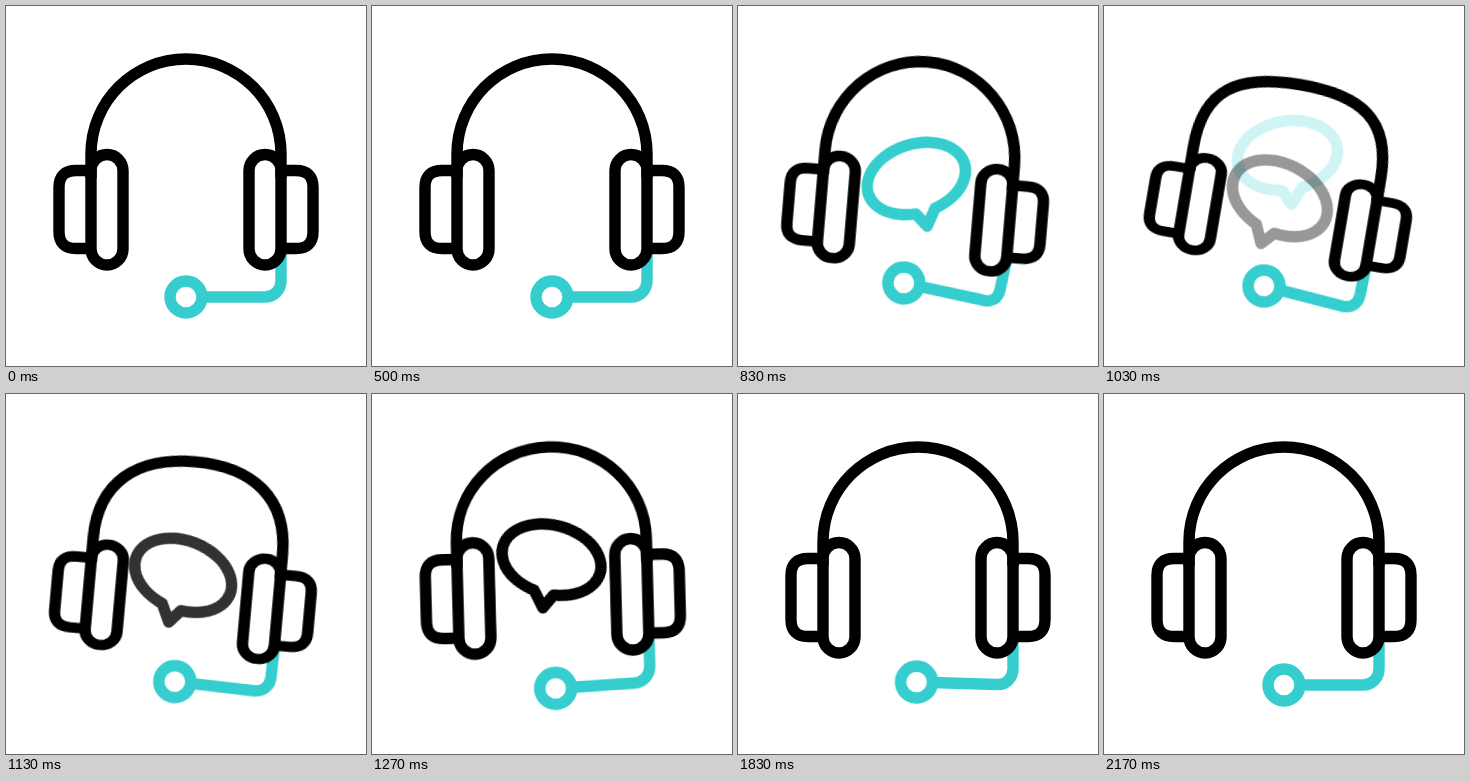
An HTML page that plays this animation: 360 px wide and 360 px high, repeating every 2500 ms.

```html
<!DOCTYPE html>
<html lang="en">
<head>
<meta charset="utf-8">
<title>Headset</title>
<style>
  html, body { margin: 0; width: 100%; height: 100%; overflow: hidden; background: #fff; }
  svg { display: block; width: 360px; height: 360px; }

  .line { fill: none; stroke: #000; stroke-width: 11.4; stroke-linejoin: round; }
  .teal { stroke: #35cdce; }
  .pads * { vector-effect: non-scaling-stroke; }

  .headset, .pads, .band, .boom, .mic { animation: 2.5s linear infinite; }
  .headset { transform-origin: 132px 171px; animation-name: tilt; }
  .pads { transform-origin: 180px 204px; animation-name: squash; }
  .band { animation-name: flex; }
  .boom { animation-name: bend; }
  .mic { fill: #fff; animation-name: sway; }

  .bubble {
    --side: 1;
    opacity: 0;
    animation: rise 2.5s linear .93s infinite backwards, fade 2.5s linear .93s infinite backwards;
  }
  .bubble.teal { --side: -1; animation-delay: .55s; }

  @keyframes tilt {
    0%, 20% { transform: rotate(0deg); animation-timing-function: ease-in; }
    33.2% { transform: rotate(4.75deg); animation-timing-function: ease-out; }
    41.2% { transform: rotate(9.6deg); animation-timing-function: cubic-bezier(.35, 0, .5, 1); }
    51.6% { transform: rotate(-1.6deg); animation-timing-function: ease-in-out; }
    64%, 100% { transform: rotate(0deg); }
  }

  @keyframes squash {
    0%, 20% { transform: scaleY(1); animation-timing-function: ease-in; }
    33.2% { transform: scaleY(.928); animation-timing-function: ease-out; }
    41.2% { transform: scaleY(.845); animation-timing-function: cubic-bezier(.35, 0, .5, 1); }
    51.6% { transform: scaleY(1.01); animation-timing-function: ease-in-out; }
    64%, 100% { transform: scaleY(1); }
  }

  @keyframes flex {
    0%, 20% {
      d: path("M85 172L85 148C85 95.5 127.5 53 180 53C232.5 53 275 95.5 275 148L275 172");
      animation-timing-function: ease-in-out;
    }
    33.2% {
      d: path("M85 172L85 148C85 95 127.5 51.5 180 51.5C232.5 51.5 275 95 275 148L275 172");
      animation-timing-function: ease-in-out;
    }
    41.2% {
      d: path("M85 172L85 148C85 89 118 69.3 180 69.3C242 69.3 275 89 275 148L275 172");
      animation-timing-function: cubic-bezier(.35, 0, .5, 1);
    }
    51.6% {
      d: path("M85 172L85 148C85 95.5 127.5 54 180 54C232.5 54 275 95.5 275 148L275 172");
      animation-timing-function: ease-in-out;
    }
    64%, 100% {
      d: path("M85 172L85 148C85 95.5 127.5 53 180 53C232.5 53 275 95.5 275 148L275 172");
    }
  }

  @keyframes bend {
    0%, 20% {
      d: path("M180 291L259 291C268 291 275 284 275 275L275 245");
      animation-timing-function: ease-in-out;
    }
    33.2% { d: path("M174.6 273.8L253 284C263 286.5 269.5 282 271 273L275 240"); }
    41.2% {
      d: path("M177.8 273.8L257 280.5C267 282 273.5 276 274 267L275 235");
      animation-timing-function: cubic-bezier(.35, 0, .5, 1);
    }
    50.8% { d: path("M180.4 295.7L259 292.5C268 292 275 285 275 276L275 245"); }
    59.2% {
      d: path("M180.4 296.3L259 292C268 291.5 275 284 275 275L275 245");
      animation-timing-function: ease-in-out;
    }
    73.2% {
      d: path("M178.5 288L259 290.5C268 291 275 284 275 275L275 245");
      animation-timing-function: ease-in-out;
    }
    84%, 100% { d: path("M180 291L259 291C268 291 275 284 275 275L275 245"); }
  }

  @keyframes sway {
    0%, 20% { transform: translate(180px, 291px); animation-timing-function: ease-in-out; }
    33.2% { transform: translate(174.6px, 273.8px); }
    41.2% { transform: translate(177.8px, 273.8px); animation-timing-function: cubic-bezier(.35, 0, .5, 1); }
    50.8% { transform: translate(180.4px, 295.7px); }
    59.2% { transform: translate(180.4px, 296.3px); animation-timing-function: ease-in-out; }
    73.2% { transform: translate(178.5px, 288px); animation-timing-function: ease-in-out; }
    84%, 100% { transform: translate(180px, 291px); }
  }

  @keyframes rise {
    0% { transform: translate(174px, 203.5px) rotate(calc(var(--side) * 33deg)) scaleX(var(--side)); }
    4% { transform: translate(176px, 192.5px) rotate(calc(var(--side) * 27.5deg)) scaleX(var(--side)); }
    12% { transform: translate(178.5px, 170.5px) rotate(calc(var(--side) * 16.5deg)) scaleX(var(--side)); }
    21%, 100% { transform: translate(184.5px, 144.5px) rotate(calc(var(--side) * 8deg)) scaleX(var(--side)); }
  }

  @keyframes fade {
    0% { opacity: 0; }
    10%, 13.6% { opacity: 1; }
    21%, 100% { opacity: 0; }
  }
</style>
</head>
<body>
<svg viewBox="0 0 360 360">
  <defs>
    <path id="talk" d="M11 33.7A50.4 34.5 0 1 0 -9 34L4 48.7Z"/>
    <g id="pad">
      <path d="M85 164.5H70Q53 164.5 53 181.5V225.5Q53 242.5 70 242.5H85"/>
      <rect x="85" y="148.5" width="32" height="110.5" rx="16"/>
    </g>
  </defs>
  <use class="line teal bubble" href="#talk"/>
  <use class="line bubble" href="#talk"/>
  <g class="headset">
    <path class="line teal boom" d="M180 291L259 291C268 291 275 284 275 275L275 245"/>
    <circle class="line teal mic" r="16"/>
    <path class="line band" d="M85 172L85 148C85 95.5 127.5 53 180 53C232.5 53 275 95.5 275 148L275 172"/>
    <g class="line pads">
      <use href="#pad"/>
      <use href="#pad" transform="matrix(-1 0 0 1 360 0)"/>
    </g>
  </g>
</svg>
</body>
</html>
```
